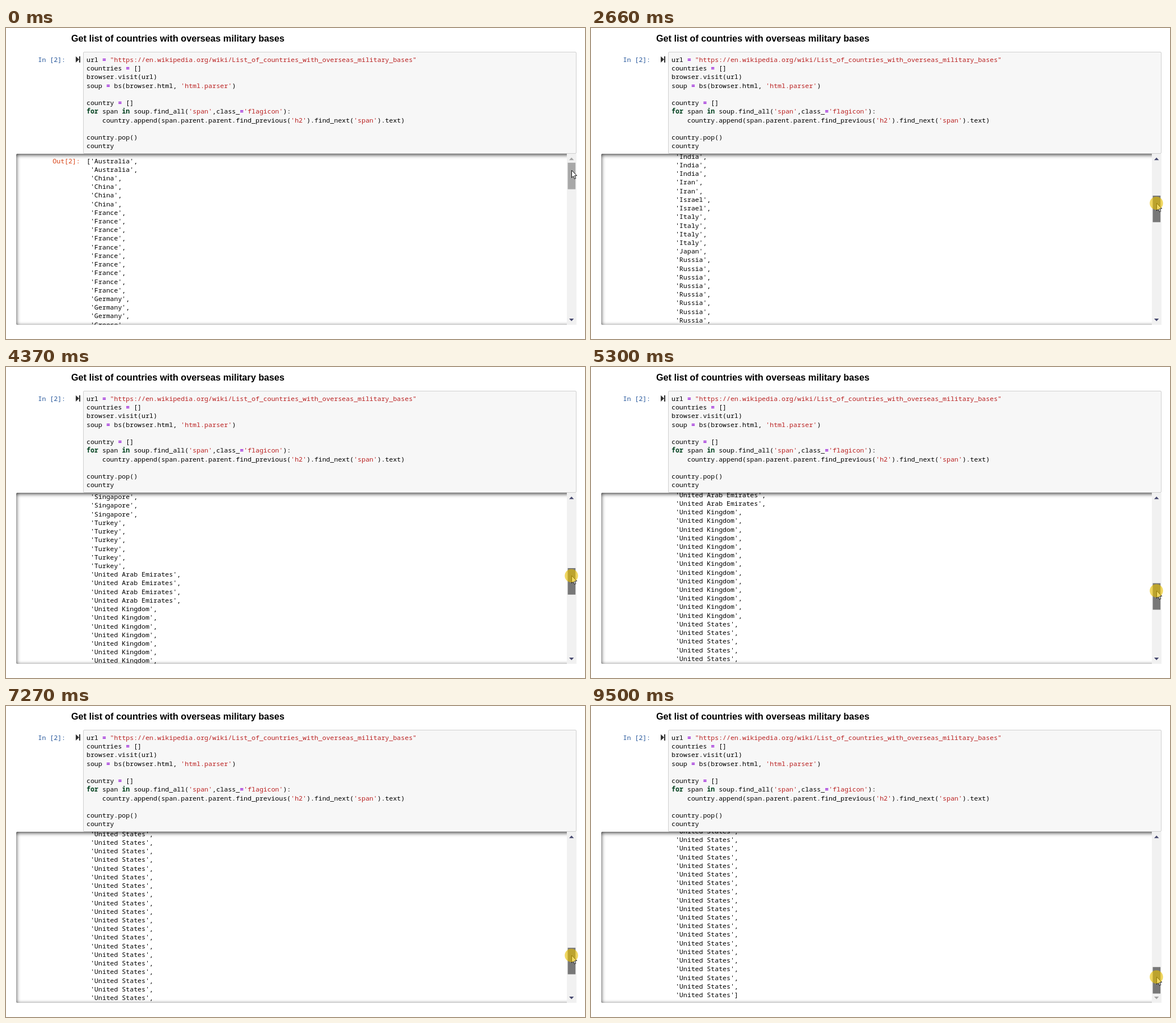
Recreate the animation shown at these times as an HTML page. Size 1021 by 549 pixels, loop 9.89 s.

```html
<!DOCTYPE html>
<html lang="en">
<head>
<meta charset="utf-8">
<title>Scrolling notebook output</title>
<style>
  html, body { margin: 0; width: 100%; height: 100%; overflow: hidden; background: #fff; }
  body { position: relative; color: #000; }
  h3, pre, div, svg { position: absolute; margin: 0; box-sizing: border-box; }
  h3 { left: 115px; top: 7.5px; font: bold 16.2px/20px "Liberation Sans", Arial, sans-serif; white-space: nowrap; }
  pre { font: 11.55px/15.22px "Noto Sans Mono", monospace; }
  .input { left: 136px; top: 42px; width: 870px; height: 179.5px; background: #f7f7f7; border: 1px solid #cfcfcf; border-radius: 2px; }
  .in { left: 56.5px; top: 48px; color: #26579b; }
  .code { left: 142px; top: 48px; }
  .code b { color: #00401e; }
  .code i { color: #ba2121; font-style: normal; }
  .code u { color: #9a20d8; font-weight: bold; text-decoration: none; }
  .output { left: 18px; top: 222px; width: 988px; height: 302px; overflow: hidden; border-radius: 2px; box-shadow: inset 0 1.8px 7.2px rgba(0, 0, 0, .8); }
  #rows { left: 0; top: 0; }
  #rows pre { top: 4.5px; left: 124px; }
  #rows .out { left: 64.3px; color: #d84315; }
  svg { left: 0; top: 0; }
</style>
</head>
<body>
<h3>Get list of countries with overseas military bases</h3>
<div class="input"></div>
<pre class="in">In [2]:</pre>
<pre class="code">url <u>=</u> <i>"https://en.wikipedia.org/wiki/List_of_countries_with_overseas_military_bases"</i>
countries <u>=</u> []
browser.visit(url)
soup <u>=</u> bs(browser.html, <i>'html.parser'</i>)

country <u>=</u> []
<b>for</b> span <b>in</b> soup.find_all(<i>'span'</i>,class_<u>=</u><i>'flagicon'</i>):
    country.append(span.parent.parent.find_previous(<i>'h2'</i>).find_next(<i>'span'</i>).text)

country.pop()
country</pre>
<div class="output">
  <div id="rows"><pre class="out">Out[2]:</pre><pre id="list"></pre></div>
</div>
<svg width="1021" height="549">
  <path d="M123 50l6 5.5-6 5.5zM129 50h2v11h-2z" fill="#333"/>
  <path d="M989 222h17v302h-17z" fill="#f1f1f1"/>
  <path id="up" d="M993 233.2l4.2-4.4 4.2 4.4z"/>
  <path id="down" d="M993 513l4.2 4.4 4.2-4.4z"/>
  <rect id="thumb" x="990.6" width="13.6" height="46.8"/>
  <g id="pointer">
    <path d="M.5 0v13l3-2.7 2 4.8 2.2-.9-2-4.7h4z" fill="#fff" stroke="#111"/>
    <circle id="press" r="11.7" fill="#e6be00" fill-opacity=".62"/>
  </g>
</svg>
<script>
const LOOP = 9890, STEP = 63, TRAVEL = 223, SCROLL_RATIO = 6.41;
const HOVER = 70, GRAB = 190, NUDGE = 990, START = 1190;
const $ = id => document.getElementById(id);

const counts = {
  Australia: 2, China: 4, France: 10, Germany: 3, Greece: 1, India: 7, Iran: 2, Israel: 2,
  Italy: 4, Japan: 1, Russia: 12, Singapore: 4, Turkey: 6, 'United Arab Emirates': 4,
  'United Kingdom': 13, 'United States': 38
};
const names = Object.entries(counts).flatMap(([name, n]) => Array(n).fill(`'${name}'`));
$('list').textContent = `[${names.join(',\n ')}]`;

// Mouse drag: time, pixels below the grab point
const drag = [[START, 1], [1820, 21.3], [3458, 95], [4340, 117.2], [6230, 170.5], [8057, 204], [9443, 227]];

function dragAt(t) {
  if (t < NUDGE) return 0;
  // The screen updates in even steps
  const stepped = START + Math.max(0, Math.floor((t - START) / STEP)) * STEP;
  const next = drag.findIndex(([time]) => time > stepped);
  if (next < 0) return drag.at(-1)[1];
  const [t0, y0] = drag[next - 1], [t1, y1] = drag[next];
  return y0 + (y1 - y0) * (stepped - t0) / (t1 - t0);
}

const arrowColor = enabled => enabled ? '#46486e' : '#a3a3a3';

function draw(now) {
  const t = now % LOOP;
  const mouse = dragAt(t);
  const offset = Math.min(mouse, TRAVEL);
  $('rows').style.top = -Math.round(offset * SCROLL_RATIO) + 'px';
  $('thumb').setAttribute('y', 237.8 + offset);
  $('thumb').setAttribute('fill', t < GRAB ? '#a8a8a8' : '#787878');
  $('up').setAttribute('fill', arrowColor(offset > 0));
  $('down').setAttribute('fill', arrowColor(offset < TRAVEL));
  $('pointer').setAttribute('transform', `translate(997 ${251.2 + mouse})`);
  $('press').style.display = t < HOVER ? 'none' : '';
  requestAnimationFrame(draw);
}
requestAnimationFrame(draw);
</script>
</body>
</html>
```
